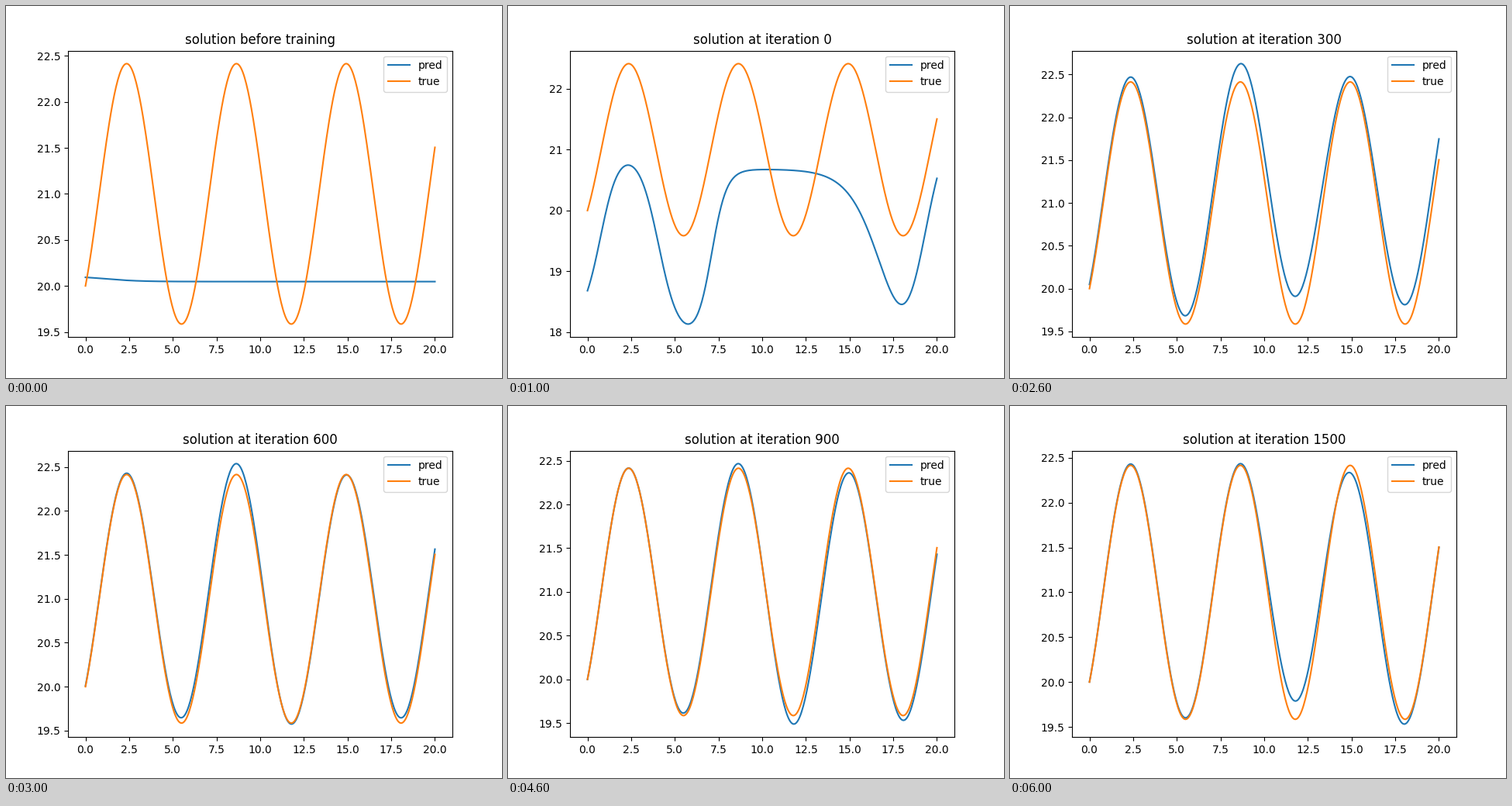
These frames come from a looping animation (640x480 px, 7000 ms). A matplotlib script:

```python
import numpy as np
import matplotlib.pyplot as plt
from matplotlib.animation import FuncAnimation

T = np.linspace(0, 20, 401)
TRUE = 21 + np.sin(T) - np.cos(T)


def steps(*terms):
    """Sum of logistic steps, each given as (height, centre, width)."""
    return sum(h / (1 + np.exp((c - T) / w)) for h, c, w in terms)


# The untrained model is nearly flat; the first fit is a rough chain of steps
STAGES = [
    ("before training", 20.109 + steps((-.062, 1.1, 1))),
    ("at iteration 0", 18.13 + steps(
        (2.9, .75, .52), (-3.18, 4.07, .58), (2.83, 7.1, .43),
        (-4.3, 17.19, 1.01), (5.1, 19.2, .68))),
]

# Later fits are the true wave plus a slowly drifting error
ERRORS = [
    .045 + steps((.35, 8.8, 1.9), (-.35, 13.5, .5), (.2, 16.6, .6)),
    .01 + steps((.14, 6.1, 1.1), (-.17, 10.1, .6), (.08, 15.5, .4)),
    steps((.07, 5.8, .9), (-.21, 10.7, .8), (.13, 14.6, .5), (-.065, 17.7, .5)),
    steps((.02, 1, .5), (-.09, 12, 1.3)),
    steps((.016, 1, .5), (.21, 10.3, .4), (-.38, 13.9, .7), (.15, 17.7, .5)),
]
for n, error in enumerate(ERRORS, 1):
    STAGES.append((f"at iteration {300 * n}", TRUE + error))

fig, ax = plt.subplots(figsize=(6.4, 4.8), dpi=100)


def draw(i):
    label, pred = STAGES[i]
    ax.clear()
    ax.plot(T, pred, label="pred")
    ax.plot(T, TRUE, label="true")
    ax.set_title(f"solution {label}")
    ax.legend(loc="upper right")


anim = FuncAnimation(fig, draw, frames=len(STAGES), interval=1000,
                     repeat=True, repeat_delay=0)
plt.show()
```
